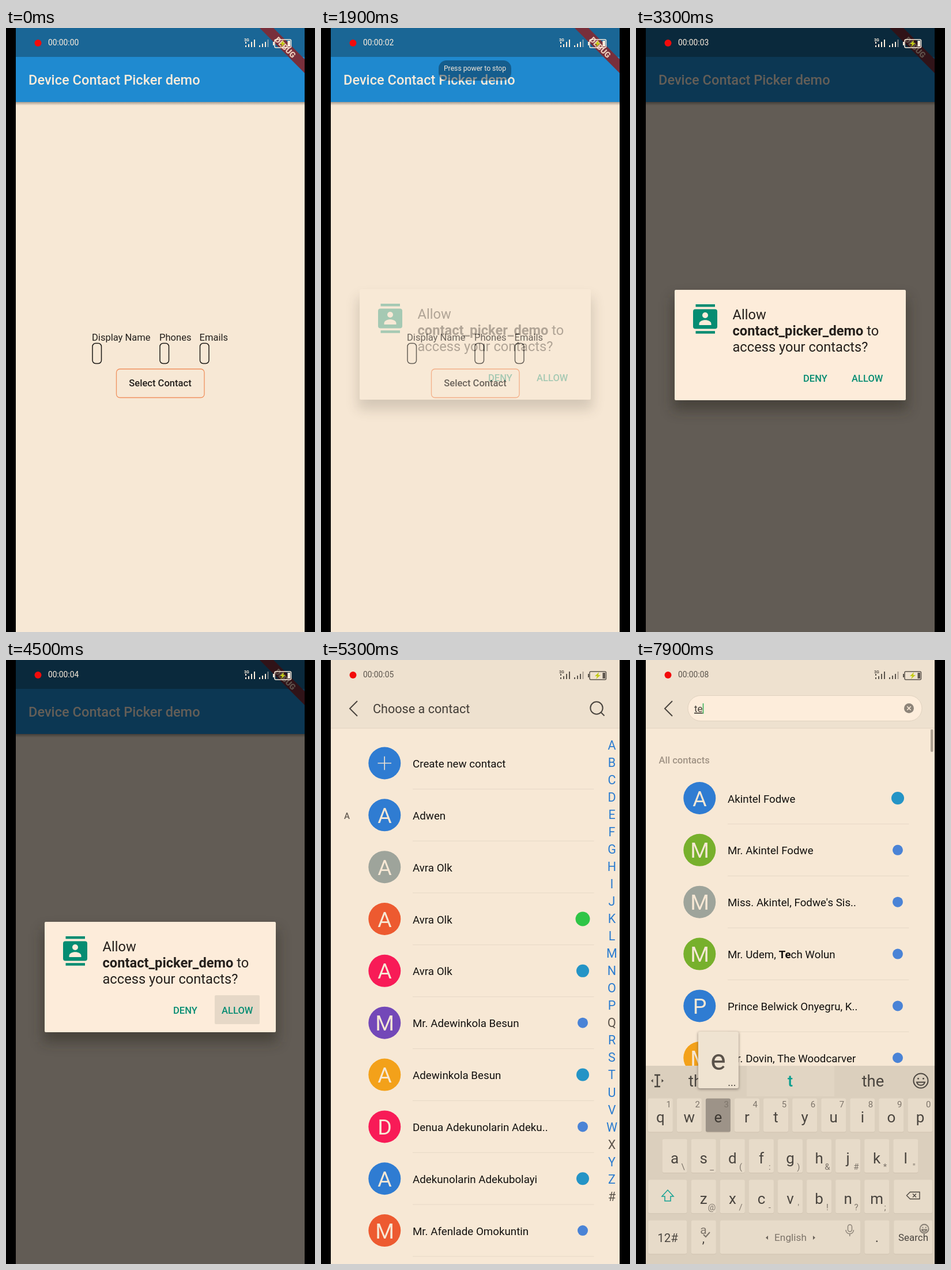
An HTML page for the animation above (8 s loop, 536 px wide and 1045 px high).

```html
<!DOCTYPE html>
<html lang="en">
<head>
<meta charset="utf-8">
<title>Contact picker demo</title>
<style>
@property --sec { syntax: '<integer>'; inherits: false; initial-value: 0; }
html, body { margin: 0; width: 100%; height: 100%; overflow: hidden; background: #000; }
body { position: relative; font-family: Roboto, sans-serif; }
svg { position: absolute; left: 0; top: 0; width: 536px; height: 1045px; }
text { font-family: Roboto, sans-serif; white-space: pre; }
.mid { text-anchor: middle; }
.medium { font-weight: 500; }
.bold { font-weight: 700; }
.line { fill: none; stroke: #4a453f; stroke-width: 2; }

.anim { animation: 8s linear infinite; }
#dim { animation-name: dim; }
#dialog { animation-name: dialog; }
#nudge { animation-name: nudge; }
#pressed { animation-name: pressed; }
#toast { animation-name: toast; }
#list { animation-name: list; }
#search { animation-name: search; }
#thumb { animation-name: thumb; }
#keyboard { animation-name: keyboard; }
#results, #suggest { animation-name: results; }
#typed1 { animation-name: typed1; }
#typed2 { animation-name: typed2; }
#press-t { animation-name: pressT; }
#press-e { animation-name: pressE; }
#status, #time { color: #fdeedd; animation-name: ink; }
#time { position: absolute; left: 73px; top: 17px; font-size: 13.8px; line-height: 16px; }
#time::after {
  counter-reset: sec var(--sec);
  content: "00:00:0" counter(sec);
  animation: clock 8s linear infinite;
}
@keyframes clock { 0%, 1% { --sec: 0; } 100% { --sec: 8; } }
@keyframes ink { 0%, 61.2% { color: #fdeedd; } 64%, 100% { color: #5b544c; } }
@keyframes toast { 0%, .5% { opacity: 0; } 3.75%, 37% { opacity: 1; } 41%, 100% { opacity: 0; } }
@keyframes dim { 0%, 23.75% { opacity: 0; } 26.25%, 57.5% { opacity: .6; } 60%, 100% { opacity: 0; } }
@keyframes dialog {
  0%, 22.5% { opacity: 0; } 23.75% { opacity: .33; }
  25.6%, 57.5% { opacity: 1; } 60%, 100% { opacity: 0; }
}
@keyframes nudge { 0%, 28.7% { transform: none; } 28.75%, 100% { transform: translateY(1px); } }
@keyframes pressed { 0%, 54.5% { opacity: 0; } 56%, 100% { opacity: 1; } }
@keyframes list { 0%, 61.2% { opacity: 0; } 64.4%, 100% { opacity: 1; } }
@keyframes search { 0%, 81.9% { opacity: 0; } 83.5%, 100% { opacity: 1; } }
@keyframes thumb { 0%, 87.5% { opacity: 1; } 90%, 100% { opacity: 0; } }
@keyframes keyboard {
  0%, 82.5% { opacity: 0; transform: translateY(210px); }
  83.75% { opacity: .35; transform: translateY(105px); }
  85% { opacity: .72; transform: translateY(38px); }
  86.25% { opacity: .95; transform: translateY(8px); }
  87.5%, 100% { opacity: 1; transform: none; }
}
@keyframes results { 0%, 93.2% { opacity: 0; } 93.3%, 100% { opacity: 1; } }
@keyframes typed1 { 0%, 93.2% { opacity: 0; } 93.3%, 98.1% { opacity: 1; } 98.2%, 100% { opacity: 0; } }
@keyframes typed2 { 0%, 98.1% { opacity: 0; } 98.2%, 100% { opacity: 1; } }
@keyframes pressT { 0%, 92.4% { opacity: 0; } 92.5%, 94.9% { opacity: 1; } 95%, 100% { opacity: 0; } }
@keyframes pressE { 0%, 97.4% { opacity: 0; } 97.5%, 100% { opacity: 1; } }
</style>
</head>
<body>
<svg viewBox="0 0 536 1045">
  <defs>
    <clipPath id="screen"><rect x="17" width="501" height="1045"/></clipPath>
    <linearGradient id="shade" x2="0" y2="1">
      <stop stop-color="#5a5048" stop-opacity=".5"/><stop offset="1" stop-color="#5a5048" stop-opacity="0"/>
    </linearGradient>
    <filter id="blur" x="-30%" y="-30%" width="160%" height="160%"><feGaussianBlur stdDeviation="11"/></filter>
    <filter id="soft"><feGaussianBlur stdDeviation="2"/></filter>
    <g id="smile" class="line"><circle r="12.5"/><path d="M-7 2.5a7.3 7.3 0 0 0 14 0z"/>
      <path d="M-4.5-5v2.5M4.5-5v2.5" stroke-width="2.6"/></g>
    <g id="caret" class="line"><path d="M-5-10H5M-5 10H5M0-10V10" stroke-width="2.4"/>
      <path d="M-7.500-3l-3.500 3 3.500 3zM7.500-3l3.500 3-3.500 3z" fill="#4a453f" stroke="none"/></g>
  </defs>
  <g clip-path="url(#screen)">
    <g id="app">
      <rect width="536" height="1045" fill="#f7e8d5"/>
      <rect y="128" width="536" height="6" fill="url(#shade)"/>
      <rect width="536" height="128" fill="#1f8ad0"/>
      <rect width="536" height="50" fill="#1a6696"/>
      <text x="39" y="98" font-size="23.6" class="medium" fill="#fbecdb">Device Contact Picker demo</text>
      <g font-size="16.56" fill="#221e1b">
        <text x="149" y="541">Display Name</text><text x="266" y="541">Phones</text><text x="335.500" y="541">Emails</text>
        <text x="267.500" y="620" class="mid medium">Select Contact</text>
      </g>
      <g fill="none" stroke="#1b1815" stroke-width="1.5">
        <rect x="150" y="545.500" width="15.500" height="35" rx="5.500"/>
        <rect x="267" y="545.500" width="15.500" height="35" rx="5.500"/>
        <rect x="336.500" y="545.500" width="15.500" height="35" rx="5.500"/>
        <rect x="191.500" y="590" width="152.500" height="49.500" rx="6" stroke="#f0915f" stroke-width="1.3"/>
      </g>
      <path d="M440 0h24l54 54v24z" fill="#782f3b"/>
      <text transform="translate(484.500 33.500) rotate(45)" y="5" font-size="14" font-weight="900" class="mid" fill="#eecdbb">DEBUG</text>
    </g>
    <rect id="dim" class="anim" width="536" height="1045"/>
    <g id="dialog" class="anim"><g id="nudge" class="anim">
      <rect x="64" y="466" width="407" height="194" fill="#2d2c20" opacity=".5" filter="url(#blur)"/>
      <rect x="67" y="452" width="401" height="191" rx="2" fill="#fdecda"/>
      <rect id="pressed" class="anim" x="362" y="579" width="78" height="50" rx="2" fill="#e6d8c7"/>
      <g fill="#058c72">
        <path d="M103.500 477h33.500v4.500h-33.500zM103.500 523.300h33.500v4.500h-33.500z"/>
        <rect x="99" y="485.500" width="42" height="34" rx="4"/>
        <g fill="#fdecda"><circle cx="120" cy="496" r="5"/><path d="M109.500 513v-2c0-9 21-9 21 0v2z"/></g>
        <g font-size="16.56" class="medium"><text x="290" y="610.500">DENY</text><text x="374" y="610.500">ALLOW</text></g>
      </g>
      <g font-size="23.66" fill="#241f1b">
        <text x="167.500" y="502.500">Allow</text>
        <text x="167.500" y="530.500"><tspan class="bold">contact_picker_demo</tspan> to</text>
        <text x="167.500" y="558.500">access your contacts?</text>
      </g>
    </g></g>

    <g id="list" class="anim">
      <rect width="536" height="1045" fill="#f7e8d5"/>
      <rect width="536" height="118" fill="#eee1cf"/>
      <path d="M17 118h501" stroke="#e2d4c2"/>
      <path d="M63 71 50 84l13 13" class="line"/>
      <text x="90" y="92" font-size="21.6" fill="#423d37">Choose a contact</text>
      <g class="line"><circle cx="478" cy="83" r="10.700"/><path d="m485.500 90.500 6 6"/></g>
      <g id="rows"></g>
      <text x="45" y="275" font-size="15" class="mid medium" fill="#665d54">A</text>
      <g id="index" font-size="21.5" class="mid"></g>
    </g>

    <g id="search" class="anim">
      <path d="M474 119h44v583h-44zM17 702h501v343H17z" fill="#f7e8d5"/>
      <rect x="80" y="50" width="438" height="67" fill="#eee1cf"/>
      <rect x="90" y="61.500" width="406" height="44" rx="22" fill="#fdeddb" stroke="#e0d2bf"/>
      <text x="101" y="90" font-size="17" fill="#bfb2a2">Find contacts</text>
      <rect id="thumb" class="anim" x="500" y="132.500" width="5.500" height="44.500" rx="2.500" fill="#6b635a"/>
    </g>
    <g id="results" class="anim">
      <rect y="119" width="536" height="926" fill="#f7e8d5"/>
      <rect x="99" y="66" width="120" height="35" fill="#fdeddb"/>
      <circle cx="473.500" cy="83.500" r="8.500" fill="#8d8479"/>
      <path d="m470.300 80.300 6.400 6.400m0-6.400-6.400 6.400" stroke="#fdeddb" stroke-width="1.6"/>
      <rect x="511" y="120" width="4.500" height="39" rx="2" fill="#aea192"/>
      <text x="39.500" y="178.500" font-size="16.6" class="medium" fill="#a09385">All contacts</text>
      <g id="matches"></g>
    </g>
    <g font-size="17" fill="#423d37" stroke-width="1.5">
      <g id="typed1" class="anim"><text x="101" y="90" text-decoration="underline">t</text><path d="M107.500 75v18" stroke="#2fae50"/></g>
      <g id="typed2" class="anim"><text x="101" y="90" text-decoration="underline">te</text><path d="M116.500 75v18" stroke="#2fae50"/></g>
    </g>

    <g id="keyboard" class="anim">
      <rect y="702" width="536" height="400" fill="#dbcfbd"/>
      <path d="M17 751.500h501" stroke="#cfc2b0"/>
      <use href="#caret" x="43" y="729"/>
      <circle cx="267" cy="729" r="12" fill="#5f574f"/>
      <path class="line" d="M433 717.500c2 5 9 5 11 0l8 5-4 6-3-1.500v13.500h-13v-13.500l-3 1.500-4-6z"/>
      <use href="#smile" x="492" y="728.500"/>
      <g id="suggest" class="anim" font-size="27.5" fill="#4a453f">
        <rect y="702" width="536" height="53" fill="#dbcfbd"/>
        <rect x="192" y="702" width="152" height="53" fill="#e1d5c3"/>
        <use href="#caret" x="37" y="728"/>
        <use href="#smile" x="494" y="728"/>
        <g class="mid"><text x="115" y="738">that</text><text x="411" y="738">the</text>
        <text x="267.500" y="738" class="medium" fill="#0a9f90">t</text></g>
      </g>
      <g id="keys" class="mid" fill="#4a453f"></g>
      <path d="m55 917 10 11h-5v8H50v-8h-5z" fill="none" stroke="#14a394" stroke-width="1.500"/>
      <path class="line" style="stroke-width:1.4" d="m469.500 926.500 6-6h16.500v12h-16.500zM480 923.500l6 6m0-6-6 6"/>
      <g class="mid" fill="#4a453f">
        <text x="55" y="1007" font-size="20.500">12#</text>
        <text x="117" y="993" font-size="21" fill="#7d746a">a</text><text x="117" y="1008" font-size="22">,</text>
        <text x="268" y="1005" font-size="17.300" fill="#7d746a">English</text>
        <text x="418" y="1007" font-size="24">.</text>
        <text x="481" y="1005" font-size="16.900">Search</text>
      </g>
      <path d="m117 994 4 4 7-8" class="line" style="stroke:#7d746a"/>
      <path d="m229 996-4 3.500 4 3.500zM307 996l4 3.500-4 3.500z" fill="#6b635a"/>
      <g fill="none" stroke="#8d8479" stroke-width="1.500"><rect x="367.500" y="977" width="7" height="12" rx="3.500"/><path d="M364 986c0 9 13.500 9 13.500 0M370.800 993v4"/></g>
      <use href="#smile" transform="translate(500 984) scale(.6)"/>
      <g id="press-t" class="anim"></g>
      <g id="press-e" class="anim"></g>
    </g>

    <g id="toast" class="anim">
      <rect x="204" y="56" width="126" height="35" rx="14" fill="#0a283c" opacity=".45"/>
      <text x="267" y="73.500" font-size="12.2" class="mid" fill="#f6e8d8">Press power to stop</text>
    </g>
    <g id="status" class="anim" fill="currentColor">
      <circle cx="55.500" cy="26" r="6" fill="#f30b0b"/>
      <text x="413" y="23" font-size="7" class="bold">3G</text>
      <path d="M415 24h2v3h-2zM415 30h2v3h-2zM420 28h2v5h-2zM425 24h2v9h-2zM430 20h2v13h-2zM439 30h2v3h-2zM444 27h2v6h-2zM449 24h2v9h-2z"/>
      <path d="M453.500 20h2v13h-2z" opacity=".45"/>
      <rect x="466" y="20" width="28.500" height="14" rx="2" fill="none" stroke="currentColor" stroke-width="1.500"/>
      <path d="M463 24h2v6h-2zM488.500 22h4.500v10h-4.500z"/>
      <path d="m482 21-7 7h4l-2 5 8-7h-4z" fill="#c3cb16"/>
    </g>
  </g>
</svg>
<div id="time" class="anim"></div>
<script>
const $ = id => document.getElementById(id);
const BLUE = '#2f7cd2', GREY = '#9ea49b', ORANGE = '#ed5a30', PINK = '#f81b57',
      PURPLE = '#7348b8', AMBER = '#f3a11a', GREEN = '#77b02c';
const badges = { chat: ['#2fc546', 12.5], plane: ['#2494c6', 11], mail: ['#4a83d6', 9] };

function row(y, [name, color, badge], letter = name[0]) {
  const [tint, r] = badges[badge] || [];
  const face = letter === '+'
    ? `<path d="M98.500 ${y}h23.500M110.200 ${y - 11.7}v23.500" stroke="#f0e3d3" stroke-width="1.6"/>`
    : `<text x="110.500" y="${y + 13.5}" font-size="37.500" class="mid" fill="#f7e8d5">${letter}</text>`;
  return `<circle cx="110.300" cy="${y}" r="28" fill="${color}"/>${face}
    <text x="159" y="${y + 7.5}" font-size="18.750" fill="#12100e">${name.replace('Te', '<tspan class="bold">Te</tspan>')}</text>
    <path d="M159 ${y + 44.8}h314.500" stroke="#e6d8c6"/>
    ${r ? `<circle cx="454" cy="${y}" r="${r}" fill="${tint}"/>` : ''}`;
}

const contacts = [
  ['Adwen', BLUE], ['Avra Olk', GREY], ['Avra Olk', ORANGE, 'chat'], ['Avra Olk', PINK, 'plane'],
  ['Mr. Adewinkola Besun', PURPLE, 'mail'], ['Adewinkola Besun', AMBER, 'plane'],
  ['Denua Adekunolarin Adeku..', PINK, 'mail'], ['Adekunolarin Adekubolayi', BLUE, 'plane'],
  ['Mr. Afenlade Omokuntin', ORANGE, 'mail'],
];
const matches = [
  ['Akintel Fodwe', BLUE, 'plane'], ['Mr. Akintel Fodwe', GREEN, 'mail'],
  ["Miss. Akintel, Fodwe's Sis..", GREY, 'mail'], ['Mr. Udem, Tech Wolun', GREEN, 'mail'],
  ['Prince Belwick Onyegru, K..', BLUE, 'mail'], ['Mr. Dovin, The Woodcarver', AMBER, 'mail'],
];
$('rows').innerHTML = row(178.5, ['Create new contact', BLUE], '+') +
  contacts.map((c, i) => row(268.3 + 89.85 * i, c)).join('');
$('matches').innerHTML = matches.map((c, i) => row(239 + 89.85 * i, c)).join('');

$('index').innerHTML = [...'ABCDEFGHIJKLMNOPQRSTUVWXYZ#'].map((c, i) =>
  `<text x="504.500" y="${154.7 + 30.04 * i}" fill="${'QX#'.includes(c) ? '#5c544b' : '#2a7cd0'}">${c}</text>`).join('');

const PITCH = 50.07;
const key = (x, y, w = 43, fill = '#e7dbc9') =>
  `<rect x="${x - w / 2}" y="${y + 1}" width="${w}" height="58" rx="3" fill="#cfc2b0"/>
   <rect x="${x - w / 2}" y="${y}" width="${w}" height="58" rx="3" fill="${fill}"/>`;
const esc = c => c === '&' ? '&amp;' : c;
const letterKey = (x, y, c, hint, hintY, fill) => key(x, y, 43, fill) +
  `<text x="${x}" y="${y + 41.5}" font-size="26">${c}</text>
   <text x="${x + 14.3}" y="${y + hintY}" font-size="15" fill="#7d746a">${esc(hint)}</text>`;
const keyRow = (x, y, letters, hints, hintY) => [...letters].map((c, i) =>
  letterKey(x + PITCH * i, y, c, hints[i], hintY)).join('');

$('keys').innerHTML =
  keyRow(42.3, 758.5, 'qwertyuiop', '1234567890', 15) +
  keyRow(67.2, 829, 'asdfghjkl', '\\_(:)&#*"', 53) +
  keyRow(117.3, 899.3, 'zxcvbnm', "@/-'!?;", 53) +
  [899.3, 969.6].map(y => key(54.7, y, 67) + key(480.7, y, 67)).join('') +
  key(117.3, 969.6) + key(267.5, 969.6, 243) + key(418, 969.6);

function pressKey(id, slot, c) {
  const x = 42.3 + PITCH * slot;
  $(id).innerHTML = `<g class="mid" fill="#3d3832">${letterKey(x, 758.5, c, slot + 1, 15, '#9d9388')}
    <rect x="${x - 35}" y="644" width="71" height="99" rx="3" fill="#5a5048" opacity=".55" filter="url(#soft)"/>
    <rect x="${x - 34.5}" y="643" width="70" height="98" rx="3" fill="#efe3d1"/>
    <text x="${x}" y="709" font-size="50" fill="#5a524a">${c}</text>
    <text x="${x + 24}" y="737" font-size="18">...</text></g>`;
}
pressKey('press-t', 4, 't');
pressKey('press-e', 2, 'e');
</script>
</body>
</html>
```
